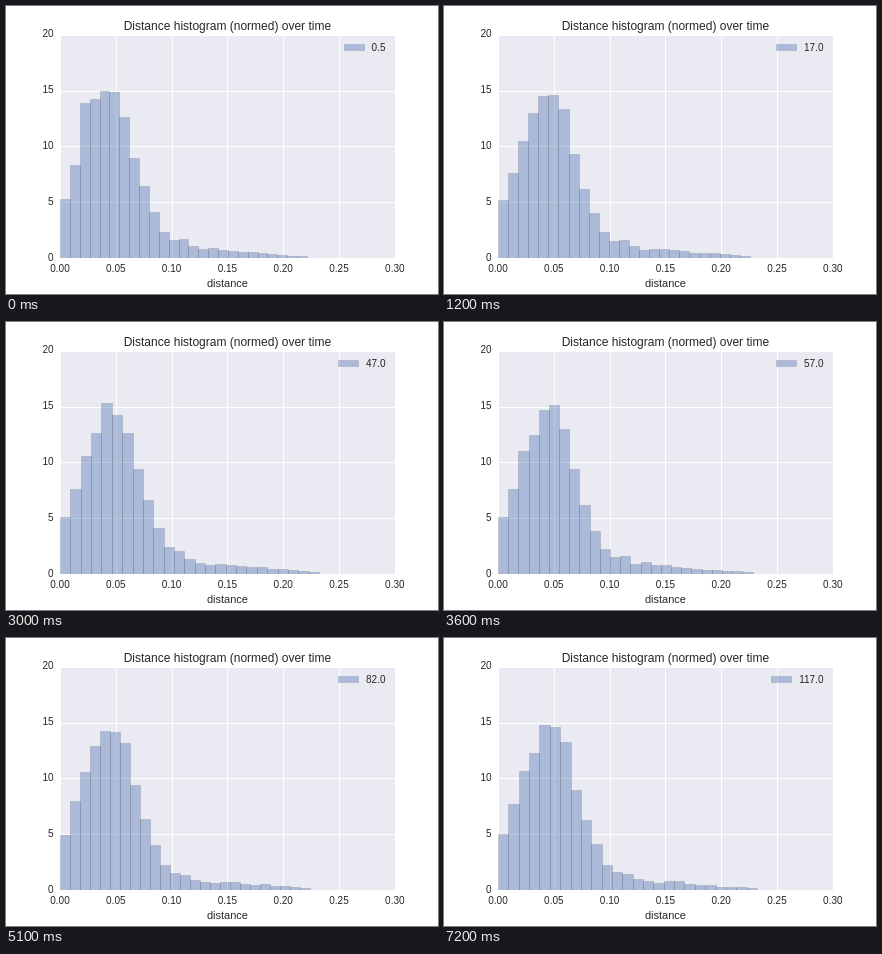
An HTML page with a canvas for the animation above (7.5 s loop, 432 by 288 pixels).

```html
<!DOCTYPE html>
<html lang="en">
<head>
<meta charset="utf-8">
<title>Distance histogram</title>
<style>
  html, body { margin: 0; width: 100%; height: 100%; overflow: hidden; background: #fff; }
  canvas { display: block; width: 432px; height: 288px; }
</style>
</head>
<body>
<canvas id="stage" width="432" height="288"></canvas>
<script>
const ctx = document.getElementById('stage').getContext('2d');
const STEP = 300, STEPS = 25, BINS = 25;
const LEFT = 54, RIGHT = 388.8, TOP = 28.8, BOTTOM = 252;
const FAMILY = 'Arial, "Liberation Sans", sans-serif';

// typical heights as [bin, height], joined by straight lines
const PROFILE = [[0, 5.1], [1, 7.7], [2, 10.7], [3, 12.5], [4, 14.8], [5, 14.7], [6, 13],
  [7, 9.1], [8, 6.4], [9, 4], [10, 2.3], [13, .95], [17, .63], [24, .18]];
// right end of the last bin in px, as [step, x]
const ENDS = [[0, 301], [10, 313], [15, 302], [24, 313]];

const snap = v => Math.round(v) + .5;
const xAt = v => LEFT + v / .3 * (RIGHT - LEFT);
const yAt = v => BOTTOM - v / 20 * (BOTTOM - TOP);

function along(points, t) {
  const i = points.findIndex(p => p[0] >= t);
  if (i < 1) return points[0][1];
  const [a, b] = [points[i - 1], points[i]];
  return a[1] + (b[1] - a[1]) * (t - a[0]) / (b[0] - a[0]);
}

// repeatable value from -1 to 1
function noise(n) {
  const s = Math.sin(n * 12.9898) * 43758.5453;
  return (s - Math.floor(s)) * 2 - 1;
}

function binHeight(step, bin) {
  const early = 3.2 * Math.exp(-step - (bin - 2.2) ** 2 / 1.2);
  const spread = bin < 11 ? .04 : .22;
  return (along(PROFILE, bin) + early) * (1 + spread * noise(step * 31 + bin + 1));
}

function text(str, x, y, size, align) {
  ctx.font = size + 'px ' + FAMILY;
  ctx.textAlign = align;
  ctx.fillStyle = '#262626';
  ctx.fillText(str, x, y);
}

function box(color, x, y, w, h) {
  ctx.fillStyle = color;
  ctx.fillRect(x, y, w, h);
}

function patch(x, y, w, h) {
  box('rgba(76,114,176,.4)', x, y, w, h);
  ctx.strokeStyle = 'rgba(38,38,38,.14)';
  ctx.lineWidth = 1;
  ctx.strokeRect(x, y, w, h);
}

function drawAxes() {
  const right = Math.round(RIGHT), top = Math.round(TOP);
  box('#fff', 0, 0, 432, 288);
  box('#eaeaf2', LEFT, top, right - LEFT, BOTTOM - top);
  for (let i = 0; i <= 6; i++) {
    const x = xAt(i * .05);
    box('#fff', Math.round(x), top, 1, BOTTOM - top);
    text((i * .05).toFixed(2), x, 266, 10, 'center');
  }
  for (let v = 0; v <= 20; v += 5) {
    const y = yAt(v);
    box('#fff', LEFT, Math.round(y), right - LEFT, 1);
    text(v, 47.5, Math.round(y + 2.6), 10, 'right');
  }
  text('Distance histogram (normed) over time', 221.4, 24, 12, 'center');
  text('distance', 221.4, 281, 11, 'center');
}

function drawBars(step) {
  const width = (along(ENDS, step) - LEFT) / BINS;
  ctx.save();
  ctx.beginPath();
  ctx.rect(LEFT, TOP, RIGHT - LEFT, BOTTOM - TOP);
  ctx.clip();
  for (let i = 0; i < BINS; i++) {
    const x = snap(LEFT + i * width), y = snap(yAt(binHeight(step, i)));
    patch(x, y, snap(LEFT + (i + 1) * width) - x, BOTTOM + .5 - y);
  }
  ctx.restore();
}

function drawLegend(step) {
  const label = (step ? step * 5 - 3 : .5).toFixed(1);
  ctx.font = '10px ' + FAMILY;
  const x = 379.5 - ctx.measureText(label).width;
  patch(snap(x - 28), 38.5, 20, 6);
  text(label, x, 45, 10, 'left');
}

function draw(now) {
  const step = Math.floor(now / STEP) % STEPS;
  drawAxes();
  drawBars(step);
  drawLegend(step);
}

const start = performance.now();
function tick() {
  draw(performance.now() - start);
  requestAnimationFrame(tick);
}
tick();
</script>
</body>
</html>
```
